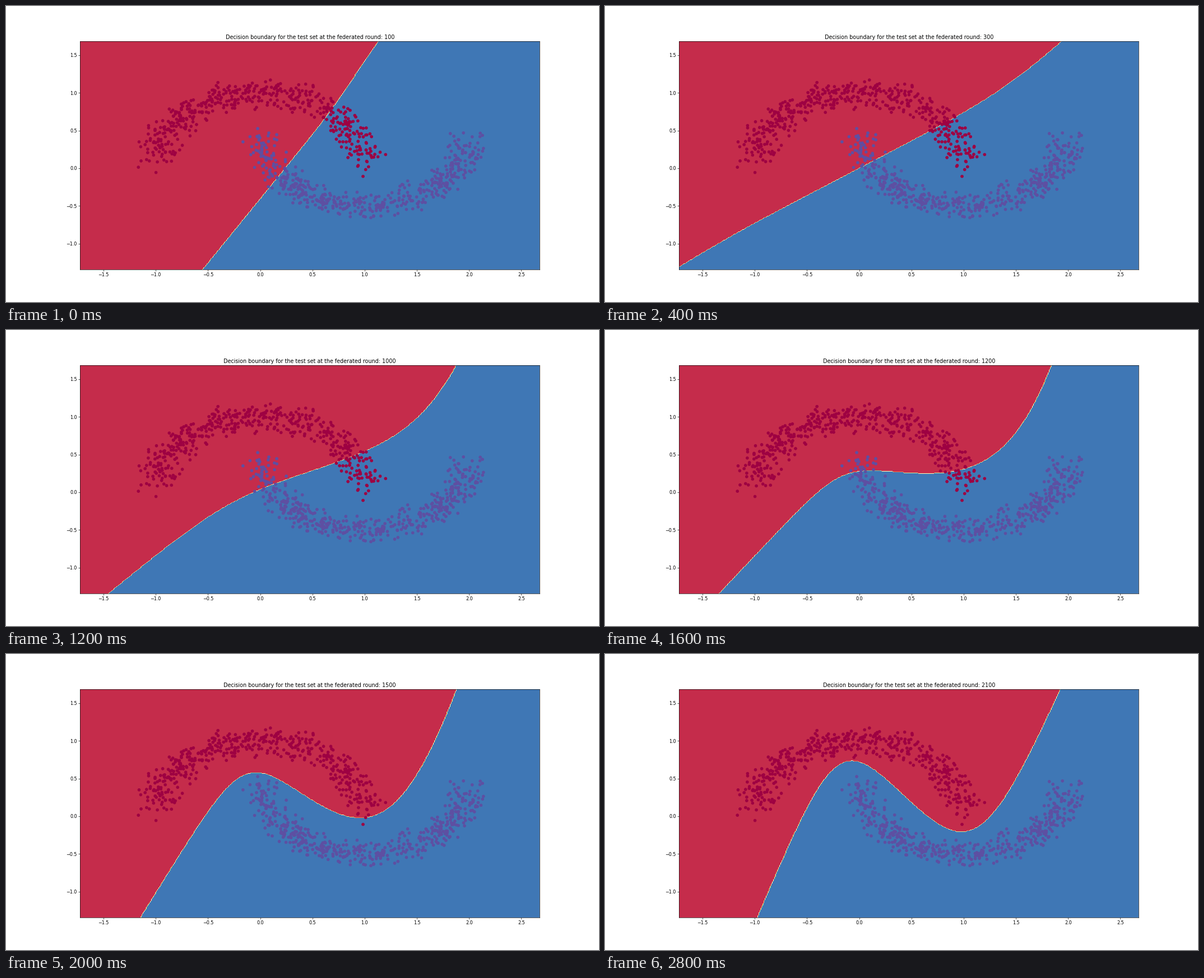
Animation of 1058 by 529 pixels, one loop 3 s. Source, as a matplotlib script:

```python
import numpy as np
import matplotlib.pyplot as plt
from matplotlib.animation import FuncAnimation

DPI = 57.5
SIZE = 18.4, 9.2  # 1058 x 529 pixels
X_MIN, X_MAX, Y_MIN, Y_MAX = -1.724, 2.678, -1.341, 1.689
CELL = 0.01

# Training round shown at each 200 ms step
ROUNDS = [100, 200, 300, 600, 800, 900, 1000, 1100, 1200,
          1300, 1500, 1600, 1800, 2000, 2100]

# Boundary at key rounds: a middle line (offset, slope) that bends at a left
# and a right knee (change of slope, x, softness)
BOUNDARY = {
    100: [(-0.412, 1.70), (0, 0, 1), (0.35, 0.65, 0.08)],
    300: [(-0.005, 0.72), (0.12, -1.2, 0.2), (0.55, 1.45, 0.25)],
    800: [(0.033, 0.58), (0.38, -0.5, 0.4), (1.6, 1.89, 0.32)],
    1000: [(0.078, 0.40), (0.73, -0.3, 0.25), (4.4, 1.91, 0.3)],
    1200: [(0.32, -0.25), (1.71, -0.17, 0.14), (8.2, 1.9, 0.36)],
    1500: [(0.72, -1.25), (3.48, -0.14, 0.15), (5.8, 1.37, 0.32)],
    2100: [(0.915, -1.55), (4.8, -0.19, 0.16), (4.65, 1.125, 0.21)],
}
KEYS = list(BOUNDARY)


def bend(z, amount, softness):
    """Soft hinge: flat for z < 0, slope `amount` for z > 0."""
    return amount * softness * np.logaddexp(0, z / softness)


def key_curve(rnd, x):
    (offset, slope), (dl, xl, wl), (dr, xr, wr) = BOUNDARY[rnd]
    return offset + slope * x - bend(xl - x, dl, wl) + bend(x - xr, dr, wr)


def boundary(rnd, x):
    """Boundary height at a round, blended between the key rounds."""
    i = min(np.searchsorted(KEYS, rnd, side="right") - 1, len(KEYS) - 2)
    a, b = KEYS[i:i + 2]
    f = (rnd - a) / (b - a)
    if b == KEYS[-1]:
        f = 1 - (1 - f) ** 1.5  # training settles towards the end
    return (1 - f) * key_curve(a, x) + f * key_curve(b, x)


def moon(rng, n):
    """Half circle of samples with bounded Gaussian noise."""
    t = rng.uniform(0.1, np.pi - 0.1, n)
    r = 0.1 * np.sqrt(-2 * np.log(rng.uniform(0.08, 1, n)))
    turn = rng.uniform(0, 2 * np.pi, n)
    return np.column_stack([np.cos(t) + r * np.cos(turn),
                            np.sin(t) + r * np.sin(turn)])


rng = np.random.default_rng(7)
N = 500
samples = np.vstack([moon(rng, N), [1, 0.5] - moon(rng, N)])
labels = np.repeat([0, 1], N)

xs = np.arange(X_MIN, X_MAX, CELL)
ys = np.arange(Y_MIN, Y_MAX, CELL)
xx, yy = np.meshgrid(xs, ys)

fig, ax = plt.subplots(figsize=SIZE, dpi=DPI)
fig.subplots_adjust(left=0.125, right=0.9, bottom=0.11, top=0.88)
ax.scatter(*samples.T, c=labels, cmap="Spectral", zorder=1)
ax.set_xlim(xs[0], xs[-1])
ax.set_ylim(ys[0], ys[-1])
title = ax.set_title("")
regions = []


def update(frame):
    rnd = ROUNDS[frame]
    while regions:
        regions.pop().remove()
    below = yy < boundary(rnd, xs)
    regions.append(ax.contourf(xx, yy, below.astype(float),
                               cmap="Spectral", zorder=0))
    title.set_text("Decision boundary for the test set "
                   f"at the federated round: {rnd}")
    return [title]


anim = FuncAnimation(fig, update, frames=len(ROUNDS), interval=200,
                     repeat=True, repeat_delay=0, blit=False)
plt.show()
```
